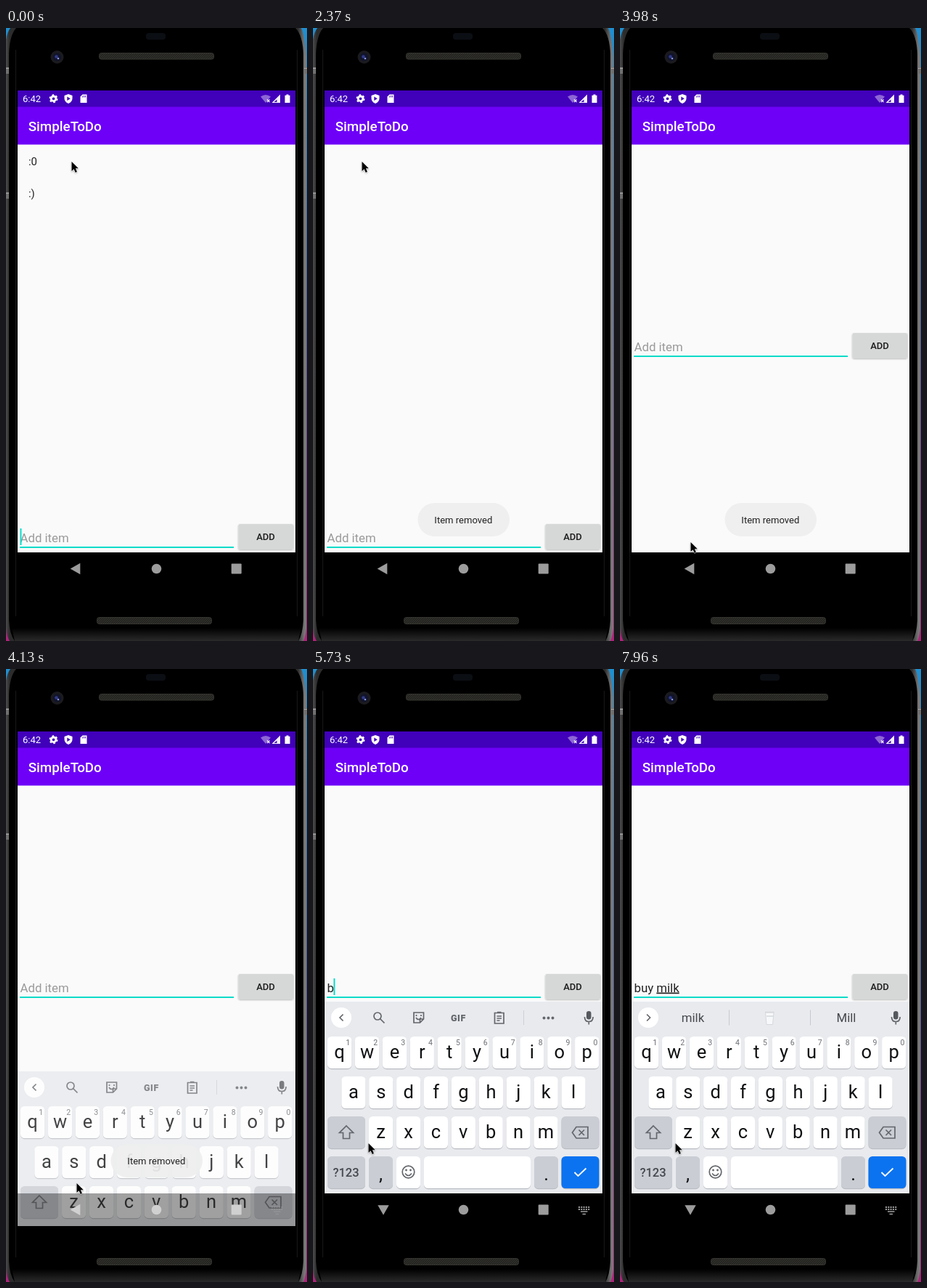
Write an HTML page that moves like this. It is 415 by 844 pixels and loops after 8000 ms.

```html
<!DOCTYPE html>
<html lang="en">
<head>
<meta charset="utf-8">
<title>To-do app demo</title>
<style>
  html, body { margin: 0; width: 100%; height: 100%; overflow: hidden; background: #000; }
  svg { display: block; width: 100%; height: 100%; font-family: Roboto, sans-serif; }
  text { white-space: pre; }
  .mid { text-anchor: middle; }
  .line { fill: none; stroke: #63666b; stroke-width: 1.7; }
  .key { fill: #fff; }
  .mod { fill: #cacdd4; }
  .letter { font-size: 25.5px; fill: #101113; text-anchor: middle; }
  .digit { font-size: 10.5px; fill: #6b6e73; text-anchor: middle; }
  .chip { font-size: 16.8px; fill: #44474b; text-anchor: middle; }
</style>
</head>
<body>
<svg viewBox="0 0 415 844" preserveAspectRatio="none">
  <defs>
    <linearGradient id="desk" x2="0" y2="1">
      <stop offset="0" stop-color="#1f8fd0"/><stop offset=".5" stop-color="#4a5a9c"/><stop offset="1" stop-color="#b0227c"/>
    </linearGradient>
    <linearGradient id="rim">
      <stop offset="0" stop-color="#4c4c4c"/><stop offset=".012" stop-color="#2c2c2c"/>
      <stop offset=".972" stop-color="#2c2c2c"/><stop offset=".99" stop-color="#6c6c6c"/>
      <stop offset="1" stop-color="#808080"/>
    </linearGradient>
    <linearGradient id="chin" x2="0" y2="1">
      <stop offset="0" stop-color="#000"/><stop offset="1" stop-color="#2a2a2a"/>
    </linearGradient>
    <pattern id="mesh" width="3" height="3" patternUnits="userSpaceOnUse">
      <rect width="3" height="3" fill="#232320"/><path d="M0 3L3 0" stroke="#3b3a35" stroke-width=".8"/>
    </pattern>
    <clipPath id="glass"><rect x="16" y="86" width="383" height="681"/></clipPath>
    <filter id="soft" x="-20%" y="-20%" width="140%" height="150%">
      <feDropShadow dx="0" dy="1" stdDeviation=".8" flood-opacity=".35"/>
    </filter>
  </defs>

  <!-- phone -->
  <rect width="415" height="844" fill="url(#desk)"/>
  <path d="M0 16Q2 5 6 0H407Q412 10 414 40V826Q413 838 410 844H5Q1 838 0 826Z" fill="url(#rim)"/>
  <path d="M4 36Q5 10 14 0H399Q409 10 410 36V815Q409 835 403 844H12Q5 835 4 815Z"/>
  <path d="M8 826H407L403 844H12Z" fill="url(#chin)"/>
  <path d="M13.500 30V810M401.500 30V810" stroke="#181818"/>
  <path d="M0 54h4v9H0zM0 226h4v9H0zM411 54h4v9h-4z" fill="#707070"/>
  <path d="M0 55.500h4M0 227.500h4M411 55.500h4" stroke="#aaa"/>
  <rect x="193" y="7" width="27" height="9" rx="4" fill="#0b0f14"/>
  <circle cx="70.500" cy="40" r="9" fill="#1b1b1f"/>
  <circle cx="70.500" cy="40" r="5.500" fill="#11142b"/>
  <circle cx="69.500" cy="39.500" r="2.300" fill="#303a86"/>
  <circle cx="72" cy="42" r="1.300" fill="#8793d8"/>
  <g fill="url(#mesh)" stroke="#35342f">
    <rect x="128.500" y="34.500" width="158" height="8.500" rx="3"/>
    <rect x="125.500" y="811.500" width="158" height="9" rx="3"/>
  </g>

  <g clip-path="url(#glass)">
    <rect x="16" y="86" width="383" height="681" fill="#fafafa"/>
    <rect x="16" y="108" width="383" height="52.500" fill="#6e00f8"/>
    <rect x="16" y="86" width="383" height="22.500" fill="#4100ba"/>
    <text x="30.700" y="141.500" font-size="18.800" font-weight="500" fill="#fff">SimpleToDo</text>

    <!-- status bar -->
    <g fill="#fff">
      <text x="23" y="102" font-size="13">6:42</text>
      <circle cx="65.500" cy="97.300" r="3.300" fill="none" stroke="#fff" stroke-width="2.800"/>
      <circle cx="65.500" cy="97.300" r="5" fill="none" stroke="#fff" stroke-width="2" stroke-dasharray="2.600 2.636"/>
      <path d="M86 91l5.500 2v4q0 4.500-5.500 7q-5.500-2.500-5.500-7v-4z"/>
      <path d="M84.300 94.500v5.500l4.500-2.700z" fill="#4100ba"/>
      <path d="M105.500 91.500h6v11.500h-9v-8.500z"/>
      <path d="M105.500 93.500v2M107.500 93v2.500M109.500 93v2.500" stroke="#4100ba" stroke-width=".9"/>
      <path d="M351 94.500q7-5 14 0l-7 8.500z" opacity=".4"/>
      <path d="M360 98.500l3.500 3.500m0-3.500l-3.500 3.500" stroke="#fff" stroke-width="1.200"/>
      <path d="M378 91.500v11.500h-11.500z" opacity=".95"/>
      <path d="M373.500 98.500v3.500h-4z" fill="#4100ba"/>
      <path d="M386.500 91.500h3v1.300h2V103h-7V92.800h2z"/>
    </g>

    <g font-size="14.900" fill="#222">
      <text id="zero" x="31" y="188.500">:0</text>
      <text id="smile" x="31" y="233">:)</text>
    </g>

    <!-- entry row -->
    <g id="entry">
      <text id="field" x="19.500" y="707.500" font-size="16.800"><tspan id="done"></tspan><tspan id="word"></tspan></text>
      <rect x="19" y="714" width="295" height="2" fill="#00dbc9"/>
      <rect id="caret" y="689" width="1.900" height="23" fill="#00dbc9"/>
      <rect x="320.500" y="683" width="75.500" height="34.500" rx="2" fill="#d6d8d7" filter="url(#soft)"/>
      <text x="358" y="705" class="mid" font-size="13.050" font-weight="500" fill="#1c1c1c">ADD</text>
    </g>

    <!-- keyboard -->
    <g id="board">
      <rect x="16" y="458" width="383" height="310" fill="#e8eaee"/>
      <circle cx="39" cy="480" r="14" fill="#fff"/>
      <g id="tools">
        <path class="line" d="M41.500 475.500l-4.500 4.500 4.500 4.500"/>
        <circle class="line" cx="89" cy="478" r="5"/><path class="line" d="M92.500 481.500l6 6"/>
        <path class="line" d="M139 473h13.500v9l-5 5H139zM147.500 487v-5h5M142 480q3 5 7 0"/>
        <path class="line" d="M142.500 476v2M149 476v2"/>
        <text x="200.500" y="484.500" class="mid" font-size="12.500" font-weight="900" letter-spacing=".7" fill="#63666b">GIF</text>
        <path class="line" d="M250.500 473.500h12.500v14.500h-12.500zM254 472.500h5.500M253.500 478h6.500M253.500 481h6.500M253.500 484h4"/>
        <path d="M290.500 470v20" stroke="#cdd0d5"/>
        <path d="M318.500 480.500h.01M324.500 480.500h.01M330.500 480.500h.01" stroke="#63666b" stroke-width="4" stroke-linecap="round"/>
      </g>
      <g id="chips">
        <path class="line" d="M37 475.500l4.500 4.500-4.500 4.500"/>
        <path d="M150.500 469.500v21M262.500 469.500v21" stroke="#c6c9ce"/>
        <text class="chip" x="100.500" y="486"></text>
        <text class="chip" x="206.500" y="486"></text>
        <text class="chip" x="312" y="486"></text>
        <g id="glassIcon"><path d="M200.500 473h11.500l-1.500 16.500h-8.500z" fill="#f7f8f9" stroke="#d5d8dc"/><path d="M200 472.500h12.500M202 478h9" stroke="#d5d8dc" stroke-width="1.500"/></g>
      </g>
      <rect x="377" y="471" width="6.500" height="11.500" rx="3.200" fill="#55585c"/>
      <path class="line" d="M374.500 479q0 6.500 5.800 6.500t5.800-6.500M380.300 485.500v4"/>
      <g id="keys"></g>
      <path class="line" d="M46 629l9.500 9.500h-5v8h-9v-8h-5z"/>
      <path class="line" d="M363 630.500h16v15.500h-16l-5.500-7.700zM366.500 634.500l7.500 7.500m0-7.500l-7.500 7.500"/>
      <text x="45.500" y="699" class="mid" font-size="16.500" font-weight="500" fill="#45484d">?123</text>
      <circle class="line" cx="131.500" cy="692.500" r="8.300"/>
      <path class="line" d="M127 694.500q4.500 6 9 0"/>
      <path d="M128.500 690h.01M134.500 690h.01" stroke="#63666b" stroke-width="2.800" stroke-linecap="round"/>
      <path d="M360.500 693l5 5 11-10.500" fill="none" stroke="#fff" stroke-width="1.900"/>
    </g>

    <!-- navigation bar -->
    <rect id="shade" x="16" y="722" width="383" height="45"/>
    <g id="nav" fill="#9c9c9c">
      <path id="back" d="M88.700 744.500l13.600-7.700v15.400z"/>
      <circle cx="207.500" cy="744.500" r="6.800"/>
      <rect x="310.700" y="737.500" width="14" height="14" rx="1"/>
      <g id="ime">
        <path d="M366 741h15.500M366 744h15.500" stroke="#a0a0a0" stroke-width="2" stroke-dasharray="2 1.300"/>
        <path d="M369 747h9.500M371.500 750.500h4.500" stroke="#a0a0a0" stroke-width="1.500"/>
      </g>
    </g>

    <g id="toast">
      <rect x="144.500" y="654" width="126.500" height="46" rx="23" fill="#eeeeee" fill-opacity=".92"/>
      <text x="207.300" y="682.300" class="mid" font-size="13.050" fill="#222">Item removed</text>
    </g>
  </g>

  <g id="pointer">
    <path d="M.5 1V14L3.600 11.200L5.700 16L7.900 15L5.900 10.300H9.800Z" stroke="#fff" paint-order="stroke" filter="url(#soft)"/>
  </g>
</svg>

<script>
const $ = id => document.getElementById(id);
const PERIOD = 8000;

function buildKeys() {
  let out = '';
  const key = (x, y, w, fill = 'class="key"') => {
    out += `<rect x="${x}" y="${y + 1.2}" width="${w}" height="44" rx="5.5" fill="#b9bcc2"/>` +
           `<rect x="${x}" y="${y}" width="${w}" height="44" rx="5.5" ${fill}/>`;
  };
  const label = (x, y, s, cls = 'letter') => { out += `<text class="${cls}" x="${x}" y="${y}">${s}</text>`; };
  const mod = 'class="mod"';
  [['qwertyuiop', 20, 506], ['asdfghjkl', 39.3, 561], ['zxcvbnm', 77, 616]].forEach(([letters, left, y], row) => {
    [...letters].forEach((c, i) => {
      const x = left + i * 37.9;
      key(x, y, 33.2);
      label(x + 16.6, y + 30, c);
      if (row === 0) label(x + 28.3, y + 11.5, (i + 1) % 10, 'digit');
    });
  });
  key(20, 616, 52, mod);
  key(342.5, 616, 52, mod);
  key(20, 671, 52, mod);
  key(77, 671, 33, mod);
  label(93.5, 704, ',');
  key(115, 671, 33);
  key(153, 671, 147);
  key(305, 671, 33, mod);
  label(321.5, 704, '.');
  key(342.5, 671, 52, 'fill="#0b73f0"');
  $('keys').innerHTML = out;
}

// Each step lists only what changes at that time.
const steps = [
  [0, { at: [90, 183], caret: 1, zero: 1, smile: 1, toast: 0, up: 0, board: null, alpha: 1,
        shade: 1, turn: 0, ime: 0, done: '', word: '', chips: null }],
  [150, { at: [67, 183], caret: 0 }],
  [600, { caret: 1 }],
  [750, { zero: 0 }],
  [890, { toast: .5 }],
  [1030, { toast: 1 }],
  [1180, { caret: 0 }],
  [1620, { caret: 1 }],
  [2070, { caret: 0 }],
  [2370, { smile: 0 }],
  [2670, { at: [80, 250], caret: 1 }],
  [2820, { at: [125, 450] }],
  [2960, { at: [165, 640] }],
  [3110, { at: [180, 738], caret: 0 }],
  [3250, { at: [130, 715] }],
  [3400, { at: [99, 689] }],
  [3550, { at: [98, 697], caret: 1 }],
  [3690, { at: [97, 707] }],
  [3840, { up: 1, caret: 0 }],
  [3990, { board: 190, alpha: .4, shade: .6 }],
  [4130, { board: 96, alpha: .78, shade: .37, ime: .5 }],
  [4270, { board: 0, alpha: 1, shade: 1, turn: -80, ime: 1 }],
  [4420, { turn: -90, toast: .5, at: [112, 706] }],
  [4560, { toast: 0, caret: 1, at: [160, 692] }],
  [4710, { at: [220, 672] }],
  [4850, { at: [247, 662] }],
  [5000, { at: [150, 656] }],
  [5140, { at: [76, 652], caret: 0 }],
  [5590, { caret: 1 }],
  [5730, { done: 'b' }],
  [6030, { done: '', word: 'bu', chips: ['bu', 'but', 'buy'] }],
  [6180, { word: 'buy' }],
  [6330, { chips: ['buy', 'but', 'buying'] }],
  [6630, { done: 'buy ', word: '', chips: ['a', 'the', 'some'] }],
  [6780, { word: 'm' }],
  [6930, { word: 'mi', chips: ['mi', 'my', 'might'] }],
  [7220, { word: 'mil', chips: ['mil', 'milk', 'miles'] }],
  [7370, { word: 'milk' }],
  [7520, { chips: ['milk', '', 'Mill'] }],
  [7960, { caret: 0 }]
];

let state = {};
const states = steps.map(([, change]) => state = { ...state, ...change });

const show = (id, opacity) => $(id).setAttribute('opacity', Number(opacity));
const move = (id, x, y) => $(id).setAttribute('transform', `translate(${x} ${y})`);

function render(s) {
  for (const id of ['zero', 'smile', 'toast', 'caret', 'shade', 'ime']) show(id, s[id]);
  $('smile').setAttribute('y', s.zero ? 233 : 188.5);
  move('pointer', ...s.at);
  move('entry', 0, s.up ? -263 : 0);
  move('board', 0, s.board ?? 310);
  show('board', s.board === null ? 0 : s.alpha);
  $('nav').setAttribute('fill', s.shade < 1 ? '#d0d0d0' : '#9c9c9c');
  $('back').setAttribute('transform', `rotate(${s.turn} 96.5 744)`);

  const typed = s.done + s.word;
  $('done').textContent = typed ? s.done : 'Add item';
  $('word').textContent = s.word;
  $('word').setAttribute('text-decoration', 'underline');
  $('field').setAttribute('fill', typed ? '#222' : '#9a9a9a');
  $('caret').setAttribute('x', 19.5 + (typed ? $('field').getComputedTextLength() - .5 : 0));

  show('tools', !s.chips);
  show('chips', !!s.chips);
  if (s.chips) {
    document.querySelectorAll('.chip').forEach((chip, i) => chip.textContent = s.chips[i]);
    show('glassIcon', !s.chips[1]);
  }
}

buildKeys();
const start = performance.now();
let current = -1;
function tick(now) {
  const t = Math.max(0, now - start) % PERIOD;
  const index = steps.findLastIndex(([time]) => time <= t);
  if (index !== current) render(states[current = index]);
  requestAnimationFrame(tick);
}
tick(start);
</script>
</body>
</html>
```
